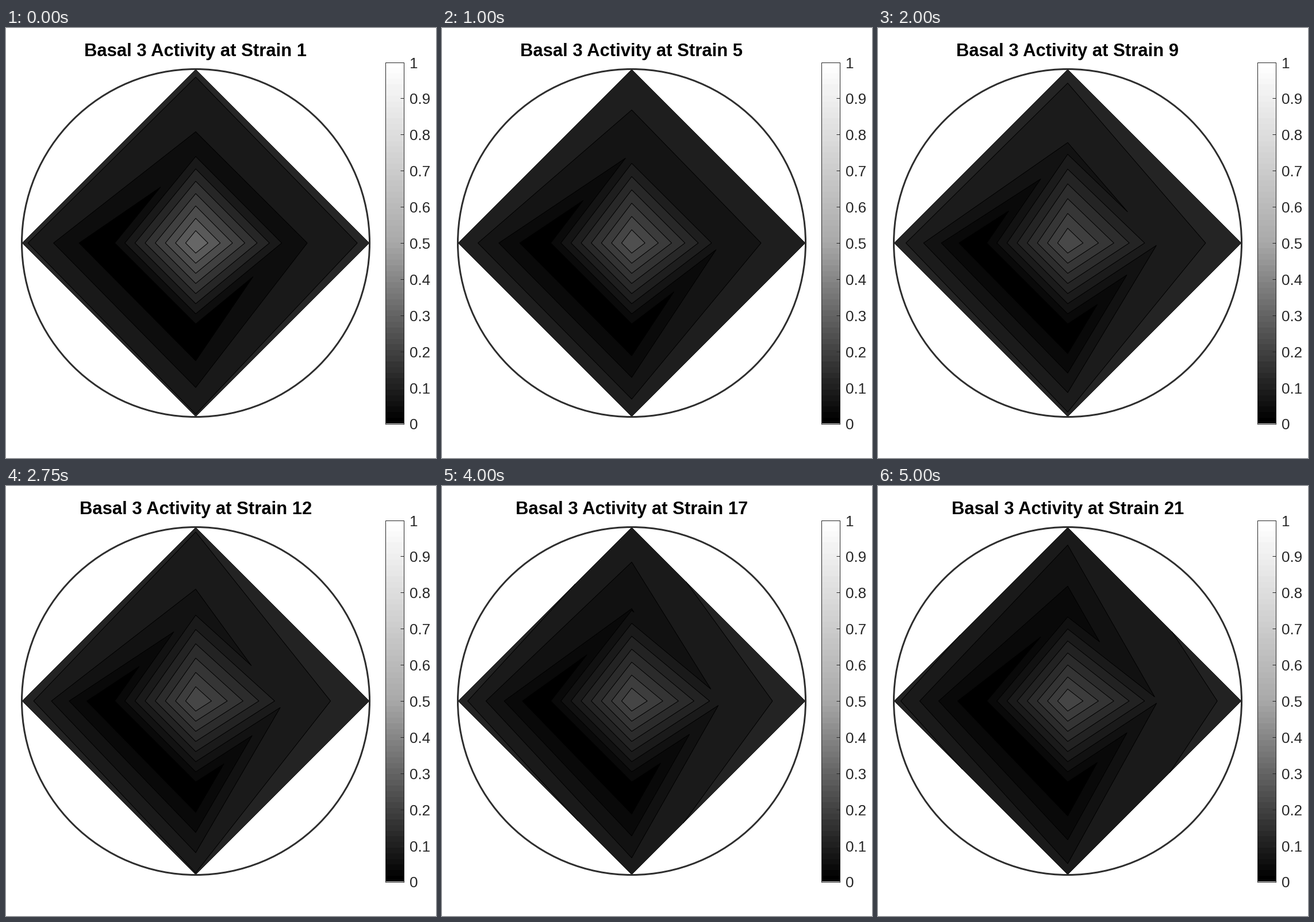
Recreate the animation shown at these times as a matplotlib script. Size 748 by 748 pixels, loop 5.25 s.

```python
import math

import numpy as np
import matplotlib.pyplot as plt
from matplotlib.animation import FuncAnimation
from matplotlib.patches import Circle, Rectangle

SIZE, DPI = 748, 100
STEPS, INTERVAL = 21, 250
CX, CY = 330, 374
R_MID, R_OUT = 158.4, 302
BANDS, SHADES = 9, 64
INK = "#262626"

plt.rcParams["font.family"] = "Liberation Sans"


def swing(step, start, peak, end, turn, power):
    """Ease from start to peak at step `turn`, then fall away to end."""
    if step < turn:
        return start + (peak - start) * (1 - math.cos(math.pi * step / turn)) / 2
    return peak + (end - peak) * ((step - turn) / (STEPS - 1 - turn)) ** power


def field(step):
    """Activity on the polar grid, in bands: 9 at the centre, 0 at the low points."""
    mid_right = swing(step, 1.59, 3.24, 3.075, 10, 1.3)
    mid_top = swing(step, 1.63, 2.88, 1.42, 9, 1.05)
    right = swing(step, 3.24, 4.70, 4.38, 8, 2)
    left = swing(step, 3.23, 4.67, 4.35, 8, 2)
    top = swing(step, 3.14, 4.26, 3.43, 7, 1.3)
    bottom = swing(step, 3.09, 4.26, 3.46, 7, 1.3)
    return np.array([
        [BANDS] * 5,
        [mid_right, mid_top, 0, 0, mid_right],
        [right, top, left, bottom, right],
    ])


def shade(value):
    """Black to light gray over the lower half, then on to white."""
    return np.interp(value, [0, 0.5, 1], [0, 0.66, 1])


def px(pixels):
    return pixels * 72 / DPI


fig = plt.figure(figsize=(SIZE / DPI, SIZE / DPI), dpi=DPI, facecolor="white")
ax = fig.add_axes([0, 0, 1, 1])
ax.axis("off")

# Colour bar
X0, X1, Y0, Y1 = 660.5, 692.5, 59.5, 688.5
ax.imshow(shade(np.linspace(1, 0, SHADES))[:, None], cmap="gray", vmin=0, vmax=1,
          extent=(X0, X1, Y1, Y0), aspect="auto", interpolation="nearest")
ax.add_patch(Rectangle((X0, Y0), X1 - X0, Y1 - Y0, fill=False, ec=INK, lw=px(1)))
for n in range(11):
    y = Y1 - (Y1 - Y0) * n / 10
    ax.plot([X1 - 6, X1], [y, y], color=INK, lw=px(1), solid_capstyle="butt")
    ax.text(702, y + 10, f"{n / 10:g}", color=INK, fontsize=px(26), va="baseline")

ax.add_patch(Circle((CX, CY), 302.5, fill=False, ec="#2e2e2e", lw=px(3), zorder=5))
title = ax.text(CX, 49, "", fontsize=px(31), fontweight="bold", color="black",
                ha="center", va="baseline")

ax.set_xlim(0, SIZE)
ax.set_ylim(SIZE, 0)

# Polar grid: right, top, left, bottom and back to right
angle = np.arange(5) * np.pi / 2
radius = np.array([0, R_MID, R_OUT])[:, None]
GX = CX + radius * np.cos(angle)
GY = CY - radius * np.sin(angle)

layers = []


def draw(step):
    while layers:
        layers.pop().remove()
    z = field(step)
    peak = 0.23 + 0.11 * math.exp(-step / 3.5)
    for k in range(BANDS):
        layers.append(ax.contourf(GX, GY, z, levels=[k or -1, BANDS + 1],
                                  colors=[str(shade(k * peak / BANDS))],
                                  antialiased=True, zorder=2))
    layers.append(ax.contour(GX, GY, z, levels=range(1, BANDS), colors="black",
                             linewidths=px(1), zorder=3))
    title.set_text(f"Basal 3 Activity at Strain {step + 1}")
    return [title]


anim = FuncAnimation(fig, draw, frames=STEPS, interval=INTERVAL,
                     repeat=True, repeat_delay=0, blit=False)
plt.show()
```
